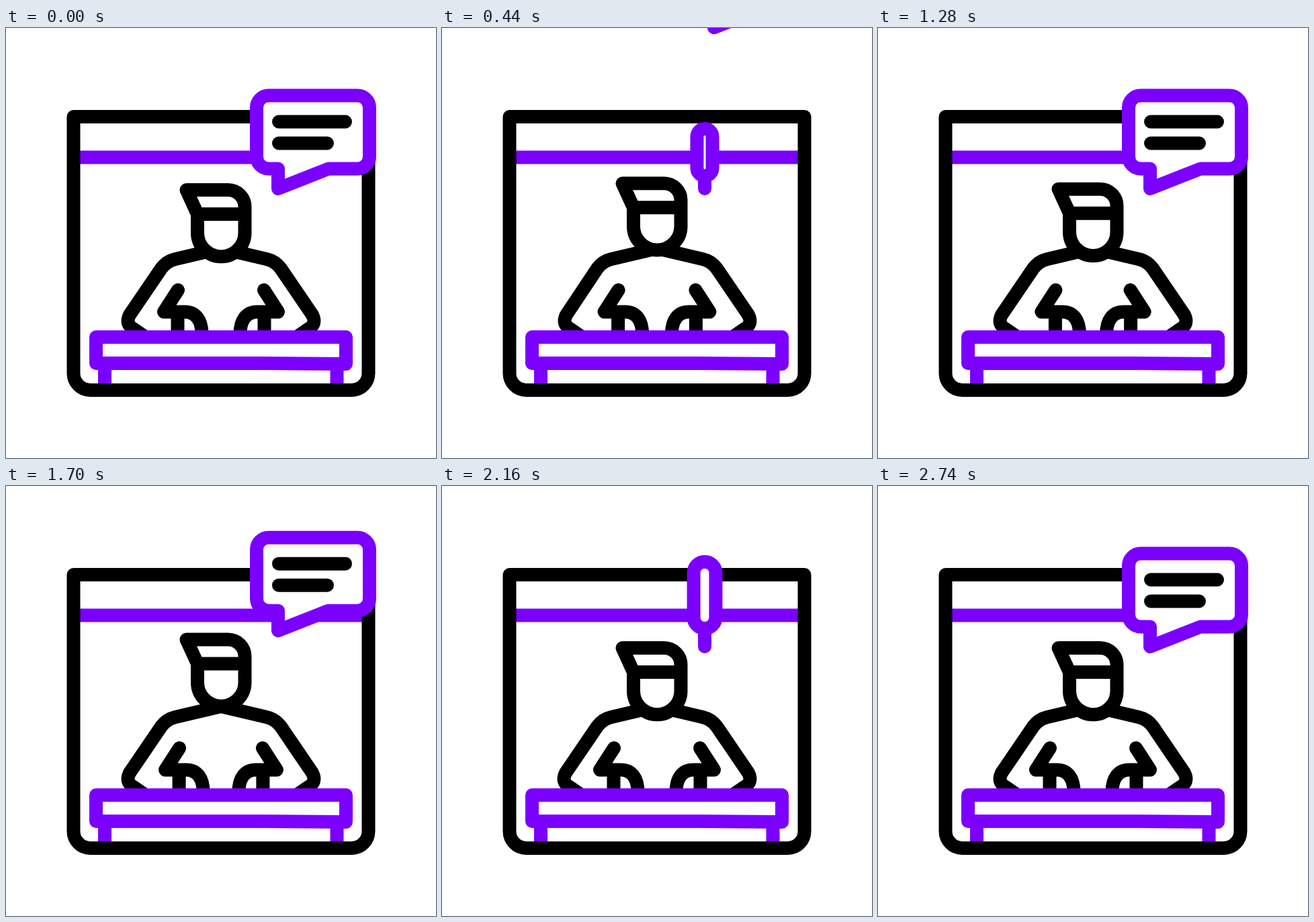
Animation of 640x640 px, one loop 3200 ms. Source, as an HTML page:

```html
<!DOCTYPE html>
<html lang="en">
<head>
<meta charset="utf-8">
<title>Speaker at a desk</title>
<style>
  html, body { margin: 0; width: 100%; height: 100%; overflow: hidden; background: #fff; }
  svg { display: block; width: 100vw; height: 100vh; }
  .ink, .accent { fill: none; stroke: #000; stroke-width: 20; stroke-linecap: round; stroke-linejoin: round; }
  .accent { stroke: #7b00ff; }
  .solid { fill: #fff; }
  .flat { stroke-linecap: butt; }
</style>
</head>
<body>
<svg viewBox="0 0 640 640">
  <defs>
    <path id="hand" d="M256 390 L235 422.5 H266 C282 422.5 291.5 434 291.5 456 M255.5 422.5 V456"/>
  </defs>

  <path class="accent flat" d="M105 192.5 H535"/>
  <path class="accent flat" d="M147 505 V532 M492.500 505 V532"/>
  <path class="ink" d="M100.500 132 H539.500 V514 A25 25 0 0 1 514.500 539 H125.500 A25 25 0 0 1 100.500 514 Z"/>

  <path class="ink" id="armL"/>
  <path class="ink" id="armR"/>
  <use class="ink" href="#hand" id="handL"/>
  <use class="ink" href="#hand" id="handR"/>
  <g id="head">
    <path class="ink solid" d="M285 277 V305 A35 35 0 0 0 355.500 305 V266 A25 25 0 0 0 330 241 H268.500 L285 277 H355.500"/>
  </g>
  <path class="accent solid" d="M134 460 H506 V500 L380 499 H134 Z"/>

  <g id="fresh">
    <path class="accent solid"/>
    <path class="ink"/>
    <path class="ink"/>
  </g>
  <g id="leaving">
    <path class="accent solid"/>
    <path class="ink"/>
    <path class="ink"/>
  </g>
</svg>
<script>
  const LOOP = 3200, STEP = 20, SECOND = 1640;
  const $ = id => document.getElementById(id);
  const ramp = (t, a, b) => Math.min(1, Math.max(0, (t - a) / (b - a)));
  const soften = x => (x + (1 - Math.cos(Math.PI * x)) / 2) / 2;

  // Piecewise linear value from [time, value] pairs
  function track(t, keys) {
    for (let i = 1; i < keys.length; i++) {
      const [a, v] = keys[i - 1], [b, w] = keys[i];
      if (t <= b) return v + (w - v) * ramp(t, a, b);
    }
    return keys[keys.length - 1][1];
  }

  const HANDS = [[0, 0], [920, 13.8], [1840, 0]];
  const ELBOW = [[0, 0], [440, 1], [760, 3], [1080, 0]];
  const BOB = 664, BOBS = 3, LIFT = 13.6;

  const armPath = e =>
    `M320 328 L252 344 Q239 347 231 358 L${184 + e} 427 Q${177 + e} 441 ${190 + e} 448 L${206 + e} 459`;

  // grow: rise out of the tail tip; widen: stretch to the right
  function bubblePath(grow, widen) {
    const rad = 18 * grow;
    const left = 391 - rad, right = 391 + rad + 132 * widen;
    const top = 239 - 138.5 * grow, bottom = 239 - 29.5 * grow;
    const arc = (x, y) => `A${rad} ${rad} 0 0 1 ${x} ${y}`;
    return `M${left + rad} ${top} H${right - rad} ${arc(right, top + rad)} V${bottom - rad} ` +
      `${arc(right - rad, bottom)} H${391 + 89 * widen} L${391 + 14 * widen} 239 V${bottom} ` +
      `H${left + rad} ${arc(left, bottom - rad)} V${top + rad} ${arc(left + rad, top)} Z`;
  }

  function drawBubble(group, grow, widen, first, second) {
    const [shape, ...lines] = group.children;
    shape.setAttribute('d', bubblePath(grow, widen));
    [[139.5, 99, first], [171.5, 72, second]].forEach(([y, len, k], i) => {
      lines[i].setAttribute('d', k > 0 ? `M406 ${y} h${len * k}` : '');
    });
  }

  const show = (el, on) => el.setAttribute('visibility', on ? 'visible' : 'hidden');
  const MIRROR = 'translate(640 0) scale(-1 1) ';

  drawBubble($('leaving'), 1, 1, 1, 1);
  $('armR').setAttribute('d', armPath(0));
  $('armR').setAttribute('transform', MIRROR);

  function render(t) {
    const phase = t % BOB / BOB;
    const lift = t < BOB * BOBS ? LIFT * soften(1 - Math.abs(1 - 2 * phase)) : 0;
    $('head').setAttribute('transform', `translate(0 ${-lift})`);

    const shift = `translate(${track(t, HANDS)} 0)`;
    $('handL').setAttribute('transform', shift);
    $('handR').setAttribute('transform', MIRROR + shift);
    $('armL').setAttribute('d', armPath(track(t, ELBOW)));

    const u = t < SECOND ? t : t - SECOND;
    const rise = 0.568 * Math.max(0, u - 18);
    show($('leaving'), rise < 260);
    $('leaving').setAttribute('transform', `translate(0 ${-rise})`);

    show($('fresh'), u >= 250);
    drawBubble($('fresh'), ramp(u, 250, 546), ramp(u, 546, 956),
      soften(ramp(u, 840, 1020)), soften(ramp(u, 900, 1100)));
  }

  const start = performance.now();
  function tick() {
    const t = Math.max(0, performance.now() - start) % LOOP;
    render(Math.floor(t / STEP) * STEP);
    requestAnimationFrame(tick);
  }
  tick();
</script>
</body>
</html>
```
